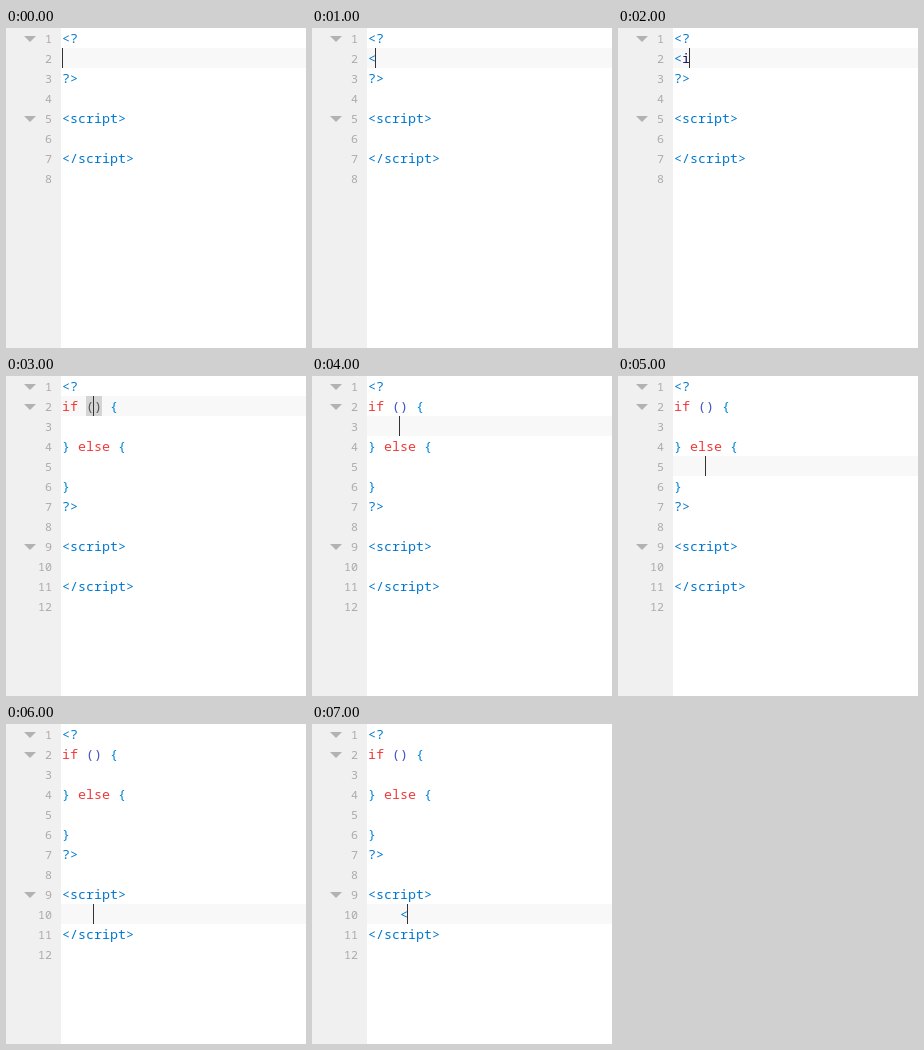
These frames come from a looping animation (300 px wide and 320 px high, 8000 ms). An HTML page with a canvas:

```html
<!DOCTYPE html>
<html lang="en">
<head>
<meta charset="utf-8">
<style>
  html, body { margin: 0; width: 100%; height: 100%; overflow: hidden; background: #fff; }
  canvas { display: block; }
</style>
</head>
<body>
<canvas id="stage" width="300" height="320"></canvas>
<script>
const ctx = document.getElementById('stage').getContext('2d');
const ROW = 20, CHAR = 8, LEFT = 56, STEP = 1000;
const TAG = '#0078d0', KEYWORD = '#f03a3a', PAREN = '#3f51c8', BRACE = '#0086d8', PLAIN = '#101060';

// A line is a list of [text, colour] pieces.
const tag = text => [[text, TAG]];
const blank = [];
const script = (body = blank) => [tag('<script>'), body, tag('<\/script>'), blank];
const short = typed => [tag('<?'), typed, tag('?>'), blank, ...script()];
const full = (body, parens = PAREN) => [
  tag('<?'),
  [['if ', KEYWORD], ['() ', parens], ['{', BRACE]],
  blank,
  [['} ', BRACE], ['else ', KEYWORD], ['{', BRACE]],
  blank,
  [['}', BRACE]],
  tag('?>'),
  blank,
  ...script(body)
];

// Caret row and column are zero-based; folds are the rows with an arrow.
const SHORT_FOLDS = [0, 4], FULL_FOLDS = [0, 1, 8];
const states = [
  { lines: short(blank), row: 1, col: 0, folds: SHORT_FOLDS },
  { lines: short(tag('<')), row: 1, col: 1, folds: SHORT_FOLDS },
  { lines: short([['<', TAG], ['i', PLAIN]]), row: 1, col: 2, folds: SHORT_FOLDS },
  { lines: full(blank, '#555'), row: 1, col: 4, folds: FULL_FOLDS, match: true },
  { lines: full(), row: 2, col: 4, folds: FULL_FOLDS },
  { lines: full(), row: 4, col: 4, folds: FULL_FOLDS },
  { lines: full(), row: 9, col: 4, folds: FULL_FOLDS },
  { lines: full(tag('    <')), row: 9, col: 5, folds: FULL_FOLDS }
];

function rect(color, x, y, w, h) {
  ctx.fillStyle = color;
  ctx.fillRect(x, y, w, h);
}

function drawFold(row) {
  const y = row * ROW + 8;
  ctx.fillStyle = '#b2b2b2';
  ctx.beginPath();
  ctx.moveTo(18, y);
  ctx.lineTo(30, y);
  ctx.lineTo(24, y + 6);
  ctx.fill();
}

function drawLine(pieces, row) {
  const base = row * ROW + 15;
  ctx.font = '11.67px "Noto Sans Mono", monospace';
  ctx.textAlign = 'right';
  ctx.fillStyle = '#aaa';
  ctx.fillText(row + 1, 46, base);

  ctx.font = '13.333px "Noto Sans Mono", monospace';
  ctx.textAlign = 'left';
  let x = LEFT;
  for (const [text, color] of pieces) {
    ctx.fillStyle = color;
    ctx.fillText(text, x, base);
    x += text.length * CHAR;
  }
}

function draw({ lines, row, col, folds, match }) {
  rect('#fff', 0, 0, 300, 320);
  rect('#f0f0f0', 0, 0, 55, 320);
  rect('#f8f8f8', 55, row * ROW, 245, ROW);
  if (match) rect('#d4d4d4', 80, row * ROW, 2 * CHAR, ROW);
  folds.forEach(drawFold);
  lines.forEach(drawLine);
  rect('#333', Math.max(LEFT, LEFT - 1 + col * CHAR), row * ROW, 1, ROW);
}

function frame() {
  draw(states[Math.floor(performance.now() / STEP) % states.length]);
  requestAnimationFrame(frame);
}
frame();
</script>
</body>
</html>
```
